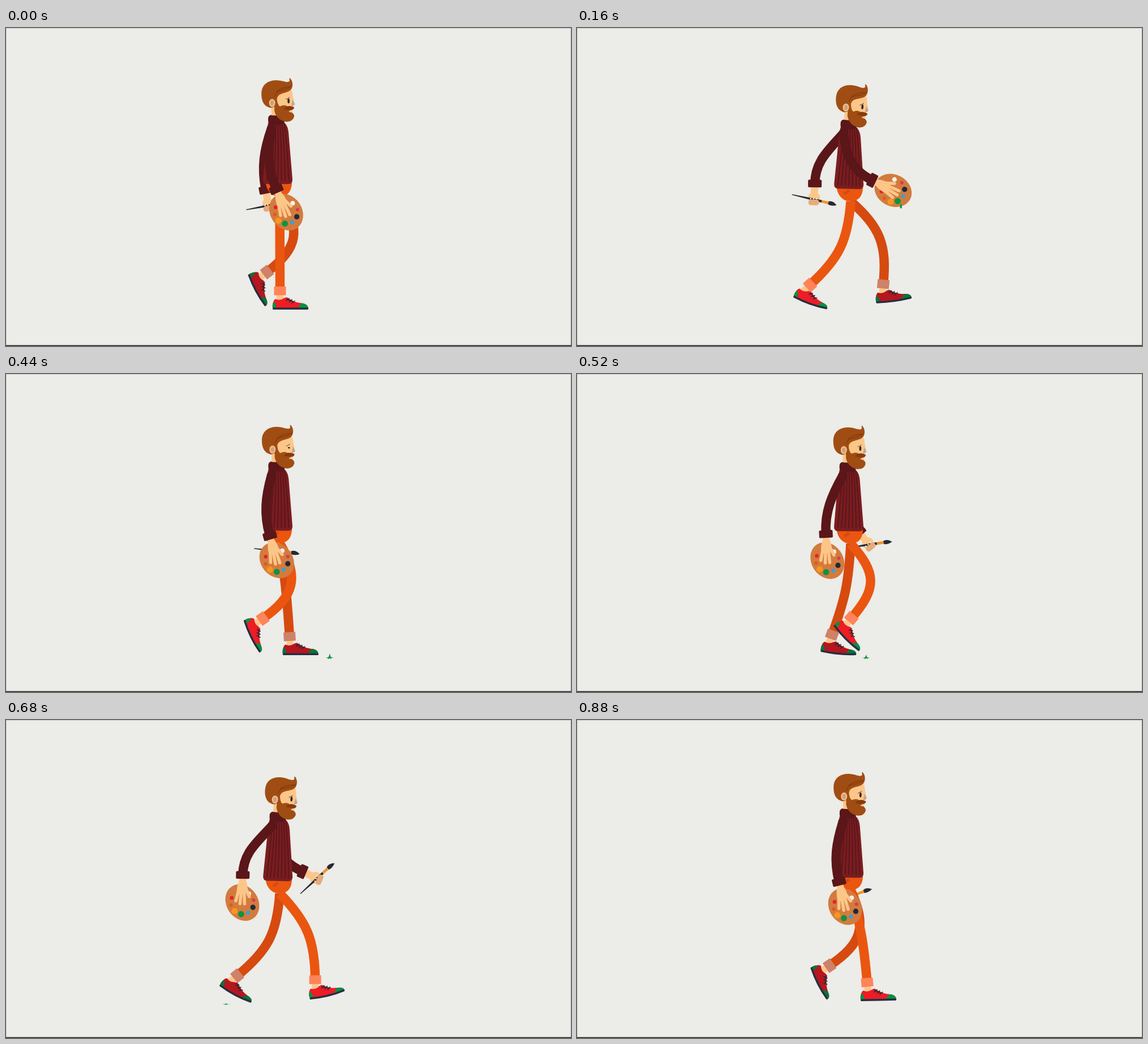
These frames come from a looping animation (998x561 px, 920 ms). An HTML page with a canvas:

```html
<!DOCTYPE html>
<html lang="en">
<head>
<meta charset="utf-8">
<title>Walking painter</title>
<style>
html, body { margin: 0; width: 100%; height: 100%; overflow: hidden; background: #ecece8; }
canvas { display: block; }
</style>
</head>
<body>
<canvas id="stage" width="998" height="561"></canvas>
<script>
const ctx = document.getElementById('stage').getContext('2d');
const LOOP = 920, HALF = LOOP / 2, STEP = 40;
const SKIN = '#fdc689', SLEEVE = '#5a1619', HAIR = '#a04d13', HAIR_DARK = '#873a0c';
const INK = '#262a35', GREEN = '#0a9443';

// Key poses of one stride.
const STRIDE = [
  { t: 0, x: 484, y: 464, bend: 0, foot: 0 },      // standing
  { t: 150, x: 413, y: 454, bend: 21, foot: 21 },  // push off
  { t: 330, x: 421, y: 446, bend: 26, foot: 47 },  // trailing
  { t: 450, x: 457, y: 431, bend: 43, foot: 66 },  // lifted
  { t: 600, x: 521, y: 437, bend: 34, foot: 15 },  // reaching
  { t: 620, x: 541, y: 452, bend: 27, foot: -6 },
  { t: 790, x: 543, y: 464, bend: 14, foot: -10 }, // landing
  { t: 890, x: 508, y: 463, bend: 4, foot: 0 }];

const rad = deg => deg * Math.PI / 180;
const cycle = (t, shift) => Math.sin(2 * Math.PI * t / LOOP + rad(shift));
const swing = t => cycle(t, 10);
const bobbing = t => 1 - Math.cos(Math.PI * (t - 14) / HALF) ** 6;

// Smooth periodic interpolation through the key poses.
function stride(time) {
  const t = time % LOOP, n = STRIDE.length;
  const key = i => {
    const lap = Math.floor(i / n), k = STRIDE[i - lap * n];
    return { ...k, t: k.t + lap * LOOP };
  };
  const i = STRIDE.findLastIndex(k => k.t <= t);
  const [a, b, c, d] = [key(i - 1), key(i), key(i + 1), key(i + 2)];
  const h = c.t - b.t, u = (t - b.t) / h, v = 1 - u;
  const at = name => {
    const m0 = (c[name] - a[name]) / (c.t - a.t) * h, m1 = (d[name] - b[name]) / (d.t - b.t) * h;
    return b[name] * (1 + 2 * u) * v * v + c[name] * u * u * (3 - 2 * u) + m0 * u * v * v - m1 * u * u * v;
  };
  return { x: at('x'), y: at('y'), bend: at('bend'), foot: at('foot') };
}

function fill(d, color) {
  ctx.fillStyle = color;
  ctx.fill(new Path2D(d));
}
function line(d, color, width, cap = 'round') {
  ctx.strokeStyle = color;
  ctx.lineWidth = width;
  ctx.lineCap = cap;
  ctx.stroke(new Path2D(d));
}
function oval(x, y, rx, ry, color, angle = 0) {
  ctx.fillStyle = color;
  ctx.beginPath();
  ctx.ellipse(x, y, rx, ry, rad(angle), 0, 7);
  ctx.fill();
}
function box(x, y, w, h, r, color) {
  ctx.fillStyle = color;
  ctx.beginPath();
  ctx.roundRect(x, y, w, h, r);
  ctx.fill();
}
function place(x, y, angle, draw) {
  ctx.save();
  ctx.translate(x, y);
  ctx.rotate(rad(angle));
  draw();
  ctx.restore();
}
function turnAbout(x, y, angle) {
  ctx.translate(x, y);
  ctx.rotate(rad(angle));
  ctx.translate(-x, -y);
}
// A bent tube whose two ends leave at the given angles.
function limb(x0, y0, a0, x1, y1, a1, reach, color, width, cap) {
  const p = rad(a0), q = rad(a1);
  line(`M${x0},${y0}C${x0 + reach * Math.sin(p)},${y0 + reach * Math.cos(p)} ` +
    `${x1 + reach * Math.sin(q)},${y1 - reach * Math.cos(q)} ${x1},${y1}`, color, width, cap);
}

// The toe curls up by `curl` when the foot is not flat.
function shoe(red, green, curl) {
  const toe = 16 - curl, sag = 16 + curl;
  fill(`M-13,16C-14,8 -11,1 -8,0Q0,4 8,-2L12,-3C20,2 26,6 36,7Q48,8 50,${toe}Q20,${sag} -13,16Z`, red);
  fill('M-13,16C-14,10 -12,6 -11,5Q-6,8 -7,16Z', green);
  fill(`M32,16Q35,7 40,7.4Q49,${9 - curl / 2} 50,${toe}Z`, green);
  line(`M-11.5,17Q20,${sag + 1} 48.5,${toe + 1}`, '#262d42', 3.4);
  line('M11,3l5,-4M16,5.5l5,-4.5M21,7.5l5,-4M12,0l11,5', INK, 1.6);
}

function leg(time, bob, colors) {
  const { x, y, bend, foot } = stride(time);
  const hipX = 483.5, hipY = 297 + 9 * bob;
  const lean = Math.atan2(x - hipX, y - hipY) * 180 / Math.PI;
  const shin = bend - lean, s = rad(shin);
  limb(hipX, hipY, bend + lean, x, y, shin, 70, colors.leg, 16.5, 'butt');
  place(x, y, shin, () => line('M0,5V17', SKIN, 12, 'butt'));
  place(x - 14 * Math.sin(s), y + 14 * Math.cos(s), foot,
    () => shoe(colors.shoe, colors.green, Math.min(3, Math.abs(foot) / 3)));
  place(x, y, shin, () => box(-10.5, -8, 21, 15.5, .5, colors.cuff));
}

// Draws the sleeve, then whatever hangs from the wrist in wrist coordinates.
function arm(time, bob, hand) {
  const s = swing(time), fore = -17 - 34 * s - 16 * s * s;
  const x = 468 + 53 * s + 3 * s * s, y = 285 - 3 * s - 15 * s * s;
  limb(469 + 2 * bob, 177 + 8.5 * bob, -15 + 24 * s - 3 * s * s, x, y, fore, 40, SLEEVE, 16.5);
  place(x, y, fore, () => {
    hand(s, fore);
    box(-12, -6.5, 24, 13.5, 2, SLEEVE);
  });
}

function brush() {
  fill('M-40,-.6L0,-2L14,-2.2V2.2L0,2L-40,.6Z', INK);
  fill('M14,-2.2L27,-2.6V2.6L14,2.2Z', '#f0952a');
  fill('M26,-2.8Q33,-6 41,1Q33,5 26,2.8Z', INK);
}

function brushArm(time, bob) {
  arm(time, bob, (s, fore) => {
    const lag = swing(time - 60), tilt = -3 - 30 * lag - 12 * lag * lag;
    line('M0,5L-1,20', SKIN, 13);
    oval(-1, 25, 10.5, 9.5, SKIN);
    place(-1, 28.5, tilt - fore, brush);
    box(-11, 28.5, 19, 10, 4.5, '#e6ab78');
    for (let i = 0; i < 3; i++) oval(-7 + 5 * i, 27, 1.3, 1.3, '#f6eadc');
  });
}

function palette() {
  oval(0, 0, 28, 34, '#d37b3e', -36);
  const paints = ['#e8212a', '#e8551c', '#f7971c', GREEN, '#2ba5dd', '#1f2a3b', '#d63c50'];
  const sizes = [3.3, 3, 5.5, 5.4, 3.4, 4.7, 3];
  paints.forEach((color, i) => {
    const a = rad(202 - 36 * i);
    oval(20.5 * Math.cos(a), 20.5 * Math.sin(a), sizes[i], sizes[i], color);
  });
  oval(11, -16, 4, 4, '#f3f1ec');
}

function paletteArm(time, bob) {
  arm(time, bob, (s, fore) => {
    const tilt = 2 - 34 * Math.max(0, cycle(time, -3));
    place(0, 45 - 4 * s, tilt - fore, palette);
    line('M0,5V18', SKIN, 12);
    fill('M-6,10Q-11,22 -10,31Q0,38 8,30Q10,20 6,10Z', SKIN);
    line('M-7,28L-11.5,46M-2,28L-4,51M3,28L4,51M5,22L12,38', SKIN, 5.5);
  });
}

function head(bob, eyeOpen) {
  ctx.save();
  turnAbout(478, 158, 4 * bob);
  fill('M468,130H481V154H469Z', SKIN);
  fill('M476,110H505L507,122L510,134Q508,138 504,138L502,150H478Z', SKIN);
  fill('M506,126L510,134Q508,138 504,137Z', '#c9a488');
  fill('M465,140C454,137 451,126 451,116C451,100 462,92 478,92C488,92 496,97 500,94' +
    'C502,92 499,89 501,88C506,92 507,100 505,105C503,113 492,113 484,117' +
    'Q478,120 478,128L477,136Q470,142 465,140Z', HAIR);
  line('M475,121Q475,112 486,110T504,102M478,112Q486,104 503,103', HAIR_DARK, 1.3);
  fill('M474,122H478Q479,136 484,138Q492,134 497,138Q503,136 509,140Q508,145 502,145' +
    'Q500,147 503,148Q509,150 509,156Q506,166 494,165Q478,162 474,146Z', HAIR);
  fill('M490,143Q497,134 509,139.5Q507,146 490,143Z', HAIR_DARK);
  oval(503, 147, 3.5, 1.2, SKIN);
  oval(470, 132, 5.5, 7, '#f6c08b');
  oval(470, 132, 3.2, 4.6, '#c9a184');
  oval(499, 128.5, 1.9, 4.2 * eyeOpen, INK);
  line('M494.5,125.5Q498,124.5 500.5,122', '#8a5a34', 1.2);
  ctx.restore();
}

function body(bob, eyeOpen) {
  ctx.save();
  ctx.translate(0, 9 * bob);
  fill('M458,268H505C506,288 497,297 483,297C469,297 459,286 458,268Z', '#ea5610');
  line('M472,284L481,278', '#d54a10', 5, 'butt');
  turnAbout(480, 275, 1.3 * bob);
  fill('M463,167H492Q498,173 499,184L506,267Q506,275 499,275H461Q454,275 454,267L461,180Z', '#7a1d21');
  for (let i = 0; i < 7; i++) {
    line(`M${468 + i * 3.9},168Q${467 + i * 4.9},200 ${460.5 + i * 6.5},269`, SLEEVE, 2);
  }
  box(463, 153, 29, 17, 6, SLEEVE);
  head(bob, eyeOpen);
  ctx.restore();
}

function paintDrop(t) {
  const fall = t - 160, slide = t - 440;
  if (fall >= 0 && slide < 0) {
    place(572, 314 + .32 * fall + .0012 * fall * fall, 0, () => fill('M0,-5Q4,4 0,4.5Q-3,4 0,-5Z', GREEN));
  } else if (slide >= 0 && slide <= 280) {
    place(572 - .763 * slide, 498 + slide / 80, 0, () => {
      ctx.scale(1, 1 - slide / 340);
      fill('M-7,3L-2,1L0,-5L1.5,1L6.5,2.5L2,3L3,5L0,3.5L-4,5L-3,3Z', GREEN);
    });
  }
}

function draw(t) {
  const bob = bobbing(t);
  const eyeOpen = Math.min(1, Math.max(.35, Math.abs(t - 440) / 70));
  ctx.fillStyle = '#ecece8';
  ctx.fillRect(0, 0, 998, 561);
  brushArm(t + HALF, bob);
  leg(t + HALF, bob, { leg: '#d64a10', cuff: '#cf8169', shoe: '#b5161f', green: '#0a7435' });
  leg(t, bob, { leg: '#ea5610', cuff: '#ff8459', shoe: '#ed1c25', green: '#0a9040' });
  body(bob, eyeOpen);
  paletteArm(t, bob);
  paintDrop(t);
  ctx.strokeStyle = '#c4c4c1';
  ctx.lineWidth = 1;
  ctx.strokeRect(.5, .5, 997, 560);
  ctx.fillStyle = '#222';
  ctx.fillRect(0, 559.5, 998, 1.5);
}

function tick() {
  draw(Math.floor(performance.now() % LOOP / STEP) * STEP);
  requestAnimationFrame(tick);
}
tick();
</script>
</body>
</html>
```
